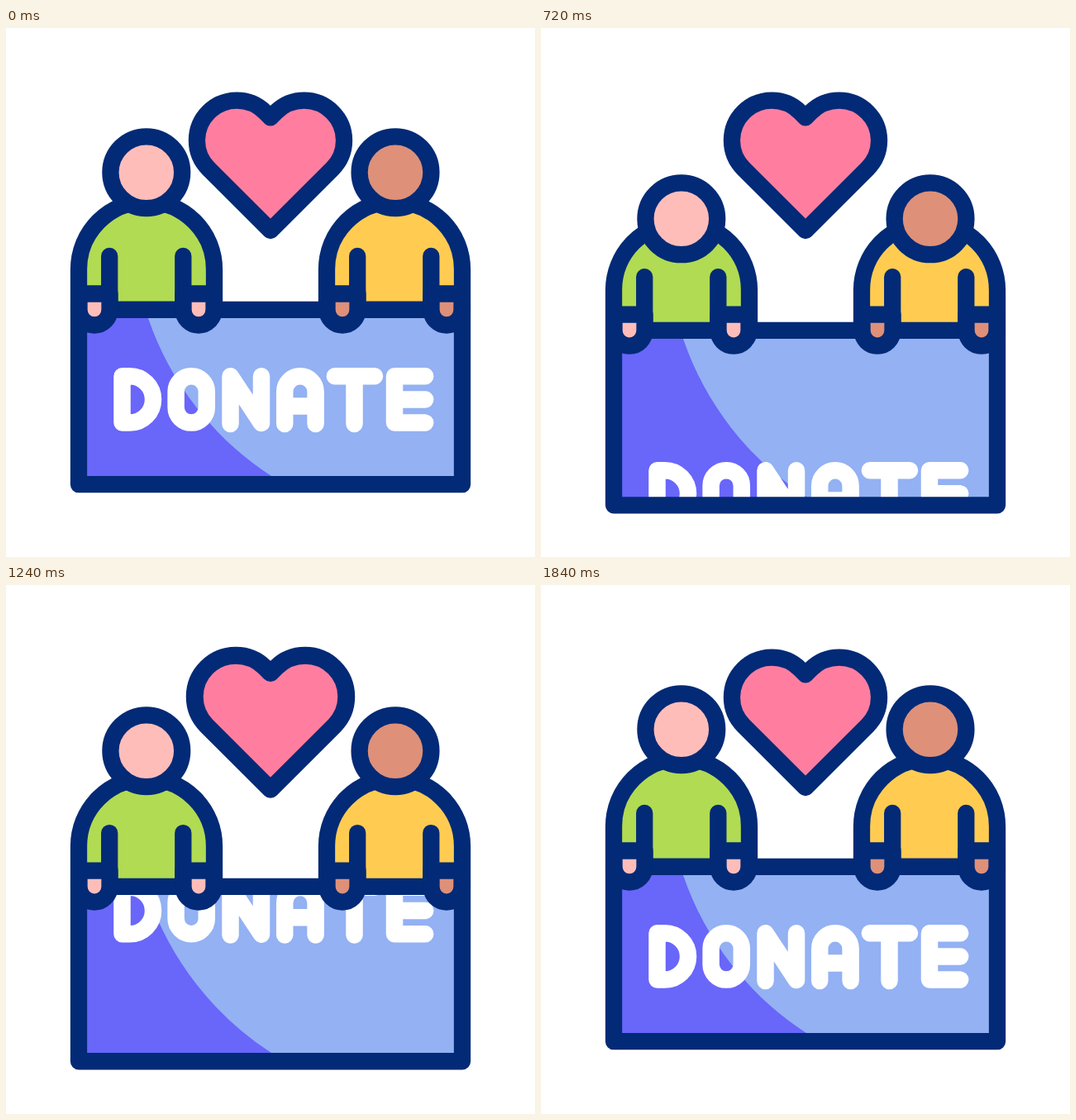
Animation of 640x640 px, one loop 2080 ms. Source, as an HTML page:

```html
<!DOCTYPE html>
<html lang="en">
<head>
<meta charset="utf-8">
<title>Donate</title>
<style>
  html, body { margin: 0; width: 100%; height: 100%; overflow: hidden; background: #fff; }
  svg { display: block; width: 100vw; height: 100vh; }
  .ink { stroke: #032a76; stroke-width: 20.3; stroke-linecap: round; stroke-linejoin: round; }
  .word { fill: none; stroke: #fff; stroke-width: 20.5; stroke-linecap: round; stroke-linejoin: round; }
  .line { fill: none; }
  .a { --skin: #ffbdba; --shirt: #b1db52; }
  .b { --skin: #de9079; --shirt: #ffcc51; }
  .skin { fill: var(--skin); }
  .shirt { fill: var(--shirt); }
</style>
</head>
<body>
<svg viewBox="0 0 640 640">
  <defs>
    <clipPath id="panel"><rect x="88" y="341" width="464" height="211.3"/></clipPath>
    <g id="torso">
      <path class="ink shirt" d="M88 341V292a82 82 0 0 1 164 0V341Z"/>
      <path class="ink line" d="M125.2 276V335M214.3 276V335"/>
    </g>
    <path id="hand" class="ink skin" d="M-18.5 321.5V341a18.5 18.5 0 0 0 37 0V321.5Z"/>
    <circle id="face" class="ink skin" cy="174.7" r="43.4"/>
  </defs>

  <path id="heart" class="ink" fill="#ff7ea0" d="M320 108.4L313.5 101.8A48.3 48.3 0 0 0 245.1 170.2L320 245L394.9 170.2A48.3 48.3 0 0 0 326.5 101.8Z"/>

  <g id="group">
    <use href="#torso" class="a"/>
    <use href="#torso" class="b" x="300"/>
    <g id="heads">
      <use href="#face" class="a" x="169.8"/>
      <use href="#face" class="b" x="471"/>
    </g>

    <g clip-path="url(#panel)">
      <rect x="88" y="341" width="464" height="212" fill="#93b1f3"/>
      <path fill="#6966fa" d="M88 341H168.8L172 351A370 370 0 0 0 321 542L336 552H88Z"/>
      <g id="word" class="word" role="img" aria-label="DONATE">
        <path d="M140.5 421.2H150a28 28.2 0 0 1 0 56.4H140.5Z"/>
        <rect x="205.6" y="421.2" width="37.2" height="56.4" rx="18.6"/>
        <path d="M271.5 479V421.2L309 478V421.2"/>
        <path d="M337.2 479V440a18.7 18.7 0 0 1 37.4 0V479M337.2 457.6H374.6"/>
        <path d="M397.8 421.2H446M421.5 421.2V479"/>
        <path d="M507.2 421.2H470V477.6H507.2M470 449.4H507.2"/>
      </g>
    </g>
    <rect class="ink line" x="88" y="340.8" width="464" height="211.4"/>

    <g class="a"><use href="#hand" x="107"/><use href="#hand" x="233"/></g>
    <g class="b"><use href="#hand" x="407"/><use href="#hand" x="533"/></g>
  </g>
</svg>
<script>
  const LOOP = 2080, STEP = 40;
  const [heart, group, heads, word] =
    ["heart", "group", "heads", "word"].map(id => document.getElementById(id));

  // cubic-bezier(.6, 0, .4, 1), solved by bisection
  function ease(x) {
    let lo = 0, hi = 1, s = .5;
    for (let i = 0; i < 24; i++) {
      s = (lo + hi) / 2;
      if (1.8 * s - 2.4 * s * s + 1.6 * s ** 3 < x) lo = s; else hi = s;
    }
    return s * s * (3 - 2 * s);
  }

  // keys: [time, value] pairs, eased between neighbours
  function track(keys, t) {
    if (t <= keys[0][0]) return keys[0][1];
    for (let i = 1; i < keys.length; i++) {
      const [t0, v0] = keys[i - 1], [t1, v1] = keys[i];
      if (t < t1) return v0 + (v1 - v0) * ease((t - t0) / (t1 - t0));
    }
    return keys[keys.length - 1][1];
  }

  const sink = [[110, 0], [960, 28.2], [1840, 0]];
  const nod = [[88, 0], [695, 31], [1400, 0]];
  const beat = [[870, 1], [1097, 1.15], [1320, 1], [1572, 1.15], [1825, 1]];

  // the word drops out below the panel and returns from above
  function wordY(t) {
    if (t < 960) return 43 * (Math.max(0, t - 120) / 440) ** 2.34;
    return -34.8 * (Math.max(0, 1840 - t) / 440) ** 2.66;
  }

  const shift = (el, y) => el.setAttribute("transform", `translate(0 ${y.toFixed(2)})`);

  function draw(time) {
    const t = Math.floor((time % LOOP) / STEP) * STEP;
    shift(group, track(sink, t));
    shift(heads, track(nod, t));
    shift(word, wordY(t));
    heart.setAttribute("transform",
      `translate(320 166) scale(${track(beat, t).toFixed(4)}) translate(-320 -166)`);
  }

  const start = performance.now();
  function tick() {
    draw(performance.now() - start);
    requestAnimationFrame(tick);
  }
  tick();
</script>
</body>
</html>
```
